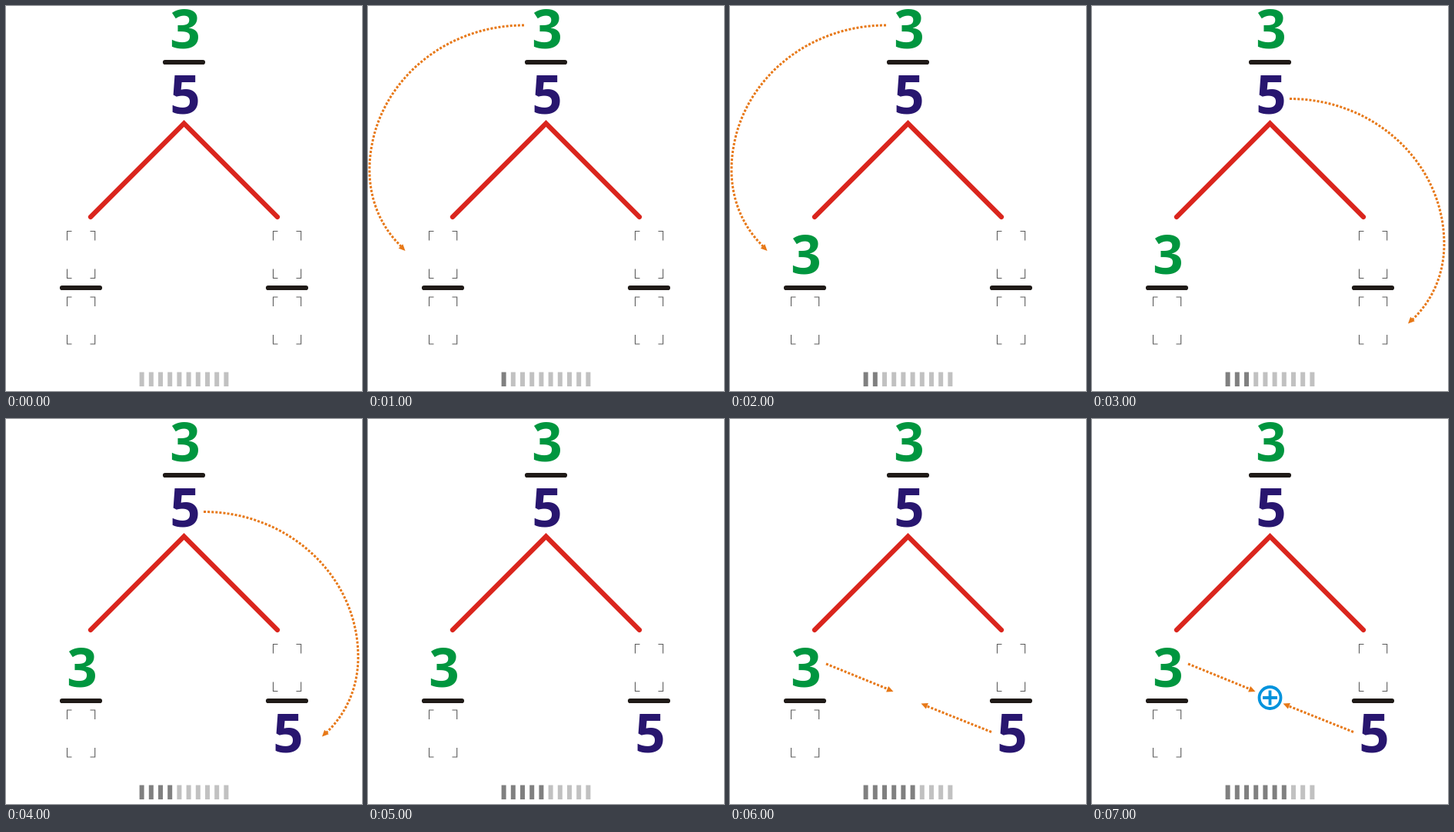
An HTML page that plays this animation: 463x500 px, repeating every 8 s.

```html
<!DOCTYPE html>
<html lang="en">
<head>
<meta charset="utf-8">
<title>Splitting a fraction</title>
<style>
  html, body { margin: 0; width: 100%; height: 100%; overflow: hidden; background: #fff; }
  svg { display: block; width: 100%; height: 100%; }
  text { font: bold 69px "Open Sans", "Noto Sans", sans-serif; text-anchor: middle; }
  .top { fill: #00963f; }
  .bottom { fill: #28166f; }
  .rule { stroke: #1f1a17; stroke-width: 6.2; stroke-linecap: round; }
  .fork { fill: none; stroke: #da251d; stroke-width: 6.2; stroke-linecap: round; }
  .slot { fill: none; stroke: #5c5c5c; stroke-width: 1.1; }
  .dots { fill: none; stroke: #e77817; stroke-width: 3; stroke-dasharray: 3 2.1; }
  .head { fill: #e77817; }
  .plus { fill: none; stroke: #0093dd; stroke-width: 3.8; }
</style>
</head>
<body>
<svg viewBox="0 0 463 500">
  <defs>
    <path id="slot" class="slot" d="M0 12V0H6M30 0H36.200V12M36.200 49V61H30M6 61H0V49"/>
    <path id="head" class="head" d="M0 0L-8.500 -4V4Z"/>
  </defs>

  <path class="rule" d="M207 73H256M73 366H122M341 366H390"/>
  <path class="fork" d="M110 274L231.500 152.500L353 274"/>
  <text class="top" x="233" y="55">3</text>
  <text class="bottom" x="233" y="140">5</text>

  <use href="#slot" x="79.500" y="292.500" data-to="2"/>
  <use href="#slot" x="79.500" y="378"/>
  <use href="#slot" x="347.500" y="292.500"/>
  <use href="#slot" x="347.500" y="378" data-to="4"/>

  <text class="top" x="99" y="348" data-from="2">3</text>
  <text class="bottom" x="367" y="433" data-from="4">5</text>

  <g data-from="1" data-to="3">
    <path class="dots" d="M203 25C92 25 2 109 2 213C2 252 17 287 43 312"/>
    <use href="#head" transform="translate(48.500 318) rotate(45)"/>
  </g>
  <g data-from="3" data-to="5">
    <path class="dots" d="M257 120.500C368 120.500 458 205 458 309C458 348 443 382 417 407"/>
    <use href="#head" transform="translate(411 412.500) rotate(135)"/>
  </g>
  <g data-from="6">
    <path class="dots" d="M125 318L206 351M340 406.500L255 372.500"/>
    <use href="#head" transform="translate(212.500 354) rotate(22)"/>
    <use href="#head" transform="translate(248.500 369.500) rotate(202)"/>
  </g>
  <path class="plus" data-from="7" d="M222 362H241M231.500 352.500V371.500M217.500 362a14 14 0 1 0 28 0a14 14 0 1 0 -28 0"/>

  <g id="progress"></g>
</svg>
<script>
  const STEP = 1000, STEPS = 8, BARS = 10;
  const progress = document.getElementById('progress');
  const timed = document.querySelectorAll('[data-from], [data-to]');

  const bars = Array.from({ length: BARS }, (_, i) => {
    const bar = document.createElementNS('http://www.w3.org/2000/svg', 'rect');
    const box = { x: 173.6 + i * 12.2, y: 475.5, width: 6, height: 18.5 };
    for (const key in box) bar.setAttribute(key, box[key]);
    return progress.appendChild(bar);
  });

  function draw(now) {
    const step = Math.floor(now / STEP) % STEPS;
    for (const el of timed) {
      const { from = 0, to = STEPS } = el.dataset;
      el.style.display = step >= from && step < to ? '' : 'none';
    }
    bars.forEach((bar, i) => bar.setAttribute('fill', i < step ? '#808080' : '#c1c1c1'));
    requestAnimationFrame(draw);
  }
  draw(performance.now());
</script>
</body>
</html>
```
